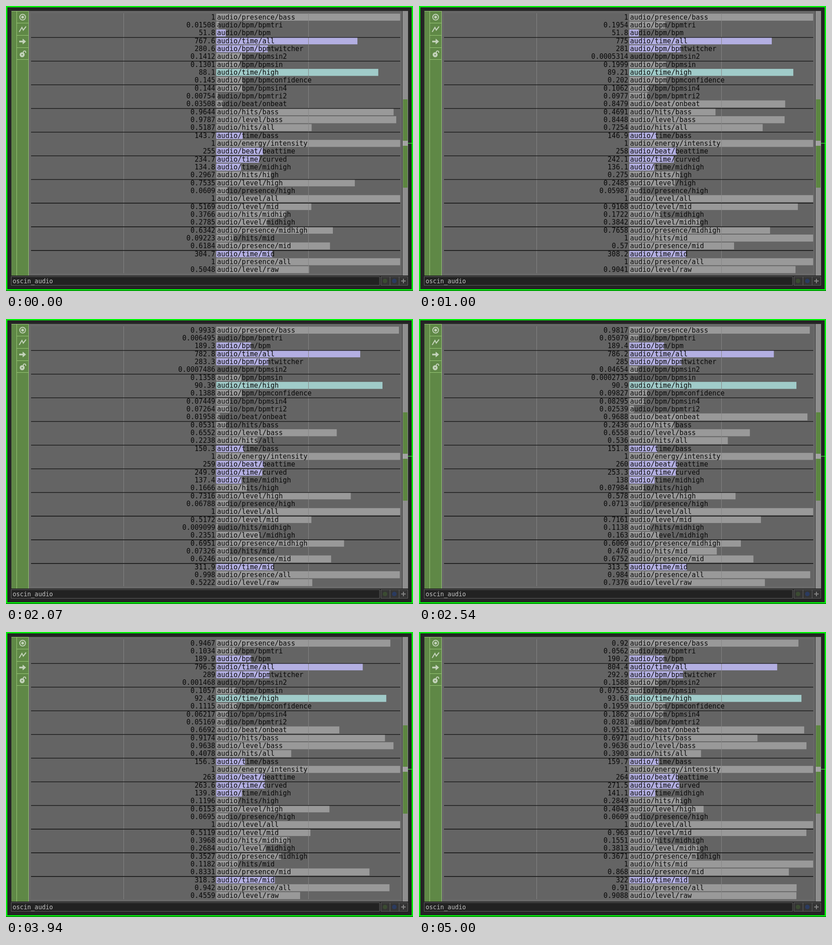
Animation of 894 by 626 pixels, one loop 5.07 s. Source, as an HTML page:

```html
<!DOCTYPE html>
<html lang="en">
<head>
<meta charset="utf-8">
<title>Audio channels</title>
<style>
  html, body { margin: 0; width: 100%; height: 100%; overflow: hidden; background: #222; }
  svg { display: block; width: 894px; height: 626px; }
  text { font: 15px "DejaVu Sans Mono", "Noto Sans Mono", monospace; fill: #080808; white-space: pre; }
  .value { text-anchor: end; }
  .name { font-size: 13.4px; fill: #c4c4c4; }
</style>
</head>
<body>
<svg id="stage" viewBox="0 0 894 626">
  <rect width="894" height="626" fill="#0c300c"/>
  <rect x="1.5" y="1.5" width="891" height="622" fill="#242424" stroke="#00ec08" stroke-width="3"/>
  <rect x="11" y="10" width="873" height="582" fill="#333"/>

  <g id="sidebar">
    <rect x="12" y="11" width="38" height="581" fill="#5f8846"/>
    <path d="M12 11.5H50M23.5 11V592M49.5 11V592M24 37.5H50M24 64.5H50M24 91.5H50M24 117.5H50"
          fill="none" stroke="#9aca78"/>
    <g fill="none" stroke="#c3d2ba" stroke-width="2">
      <circle cx="36.5" cy="24.5" r="6.3"/>
      <circle cx="36.5" cy="24.5" r="2" fill="#c3d2ba"/>
      <path d="M29 57L35 47L38 53L44 45" stroke-width="2.2"/>
      <path d="M29 78H39" stroke-width="3.6"/>
      <path d="M37 72.5L43.5 78L37 83.5Z" fill="#c3d2ba" stroke-width="1"/>
      <circle cx="35.5" cy="107" r="4.5" fill="#c3d2ba"/>
      <path d="M38 104V101A2.7 2.7 0 0 1 43.3 101V103"/>
    </g>
    <circle cx="35.5" cy="107" r="1.4" fill="#5f8846"/>
  </g>

  <rect x="50" y="11" width="820" height="581" fill="#686868"/>
  <rect x="55" y="16" width="811" height="571" fill="#646464"/>
  <g id="chart"></g>
  <path d="M258.5 16V587M664.5 16V587" stroke="#858585" fill="none"/>
  <g id="labels"></g>

  <g id="scrollbar">
    <rect x="871" y="11" width="12" height="581" fill="#8e8e8e"/>
    <rect x="872" y="205" width="10" height="194" fill="#5c8640"/>
    <rect x="871" y="296" width="12" height="11" fill="#a3a3a3"/>
    <path d="M883 301.5H894" stroke="#3fdc3f" stroke-width="1.4"/>
  </g>

  <g id="footer" stroke="#626262">
    <rect x="11.5" y="594.5" width="809" height="19" fill="#222"/>
    <path d="M823.5 594.5H882.5V613.5H823.5ZM843.5 594.5V613.5M863.5 594.5V613.5" fill="#343434"/>
    <circle cx="832.5" cy="604" r="5" fill="#3b4b32" stroke="none"/>
    <circle cx="853" cy="604" r="5" fill="#2b3b60" stroke="none"/>
    <path d="M873 599V609M868 604H878" stroke="#858585" stroke-width="2.2"/>
  </g>
  <text class="name" x="14.5" y="609">oscin_audio</text>
</svg>
<script>
const SVG = 'http://www.w3.org/2000/svg';
const LOOP = 5070, FPS = 15, LENGTH = 5;
const LEFT = 461.8, FULL = 404, TOP = 16.8, PITCH = 17.33;
const SCALE = { '#999': 1, '#a0cbc9': 100, '#b3afe2': 1000 };
const [GREY, CYAN, VIOLET] = Object.keys(SCALE);

function add(parent, tag, attrs, content = '') {
  const el = document.createElementNS(SVG, tag);
  for (const key in attrs) el.setAttribute(key, attrs[key]);
  el.textContent = content;
  return document.getElementById(parent).appendChild(el);
}

const clamp = v => Math.min(1, Math.max(0, v));
const fract = v => v - Math.floor(v);

// Every signal below is a function of the time in seconds.
const one = () => 1;
const count = (from, to) => t => from + (to - from) * t / LENGTH;
const fade = (from, rate) => t => Math.min(1, from - rate * t);
const swing = (mid, depth, peak, period) => t =>
  mid + depth * Math.cos(2 * Math.PI * (t - peak) / period);

// A swing with seeded flutter on top.
function lively(mid, depth, peak, period) {
  const base = swing(mid, depth, peak, period);
  const seed = peak * 91 + mid * 37;
  return t => {
    const noise = fract(Math.sin(t * 194.847 + seed) * 43758.5453) - 0.5;
    return clamp(base(t) + noise * depth * 0.3);
  };
}

// Tempo: one phase drives all oscillators, scaled by the confidence.
const SLOW = 51.8, FAST = 189, SPEED_UP = 1.56;
const confidence = swing(0.138, 0.064, 1, 4.3);
const tempo = t => t < SPEED_UP ? SLOW : FAST + 0.32 * (t - SPEED_UP + 0.3);
const phase = t =>
  0.104 + (SLOW * Math.min(t, SPEED_UP) + FAST * Math.max(0, t - SPEED_UP)) / 60;
const wave = beats => t => confidence(t) * (1 + Math.cos(2 * Math.PI * phase(t) / beats)) / 2;
const ramp = beats => t => confidence(t) * fract(phase(t) / beats);
const twitcher = t => 281 + Math.floor(phase(t)) - (1 - fract(phase(t))) ** 8.3;

// Detected beats in seconds; each one flashes and decays.
const BEATS = [-0.67, 0.33, 0.65, 0.967, 1.28, 2.527, 2.75, 2.964, 3.853, 4.99];
const beatIndex = t => BEATS.filter(b => b <= t).length - 1;
const onBeat = t => Math.exp((BEATS[beatIndex(t)] - t) / 0.2);

const rows = [
  ['presence/bass', fade(1.045, 0.025)],
  ['bpm/bpmtri', ramp(1)],
  ['bpm/bpm', tempo, VIOLET],
  ['time/all', count(767.6, 804.4), VIOLET],
  ['bpm/bpmtwitcher', twitcher, VIOLET],
  ['bpm/bpmsin2', wave(2)],
  ['bpm/bpmsin', wave(1)],
  ['time/high', count(88.1, 93.63), CYAN],
  ['bpm/bpmconfidence', confidence],
  ['bpm/bpmsin4', wave(4)],
  ['bpm/bpmtri2', ramp(2)],
  ['beat/onbeat', onBeat],
  ['hits/bass', lively(0.5, 0.42, 4.2, 4.4)],
  ['level/bass', lively(0.82, 0.18, 4.5, 4.5)],
  ['hits/all', lively(0.5, 0.33, 0.6, 2.6)],
  ['time/bass', count(143.7, 159.7), VIOLET],
  ['energy/intensity', one],
  ['beat/beattime', t => 255 + beatIndex(t), VIOLET],
  ['time/curved', count(234.7, 271.5), VIOLET],
  ['time/midhigh', count(134.8, 141.1), VIOLET],
  ['hits/high', lively(0.19, 0.12, 0.5, 5.2)],
  ['level/high', lively(0.5, 0.25, 0, 2.15)],
  ['presence/high', swing(0.066, 0.007, 3.1, 5)],
  ['level/all', one],
  ['level/mid', lively(0.72, 0.23, 1.1, 1.9)],
  ['hits/midhigh', lively(0.2, 0.18, 3.9, 3.9)],
  ['level/midhigh', lively(0.26, 0.11, 0.9, 4)],
  ['presence/midhigh', swing(0.55, 0.22, 1.2, 6.4)],
  ['hits/mid', lively(0.55, 0.47, 1, 2.05)],
  ['presence/mid', swing(0.72, 0.15, 4.8, 7.6)],
  ['time/mid', count(304.7, 322), VIOLET],
  ['presence/all', fade(1.06, 0.03)],
  ['level/raw', lively(0.7, 0.22, 0.97, 2)]
].map(([name, read, color = GREY], i) => {
  const top = TOP + PITCH * i;
  const y = Math.round(top + 12.9);
  if (i && i % 3 === 0) add('labels', 'path', { d: `M55 ${top + 0.3}H866`, stroke: '#0c0c0c', 'stroke-width': 1.3 });
  add('labels', 'text', { x: 463.6, y }, 'audio/' + name);
  return {
    read,
    scale: SCALE[color],
    bar: add('chart', 'rect', { x: LEFT, y: top, height: 15.4, fill: color }),
    value: add('labels', 'text', { x: 459.5, y, class: 'value' })
  };
});

// Four significant digits, with an exponent for tiny values.
function format(v) {
  const short = Number(v.toPrecision(4));
  return short && short < 1e-4
    ? short.toExponential().replace(/e-(\d)$/, 'e-0$1')
    : String(short);
}

function draw(ms) {
  const step = Math.floor(Math.floor(ms % LOOP / 10) * FPS / 100);
  for (const row of rows) {
    const v = row.read(step / FPS);
    row.bar.setAttribute('width', FULL * clamp(v / row.scale));
    row.value.textContent = format(v);
  }
}

const start = performance.now();
function tick(now) {
  draw(Math.max(0, now - start));
  requestAnimationFrame(tick);
}
draw(0);
requestAnimationFrame(tick);
</script>
</body>
</html>
```
